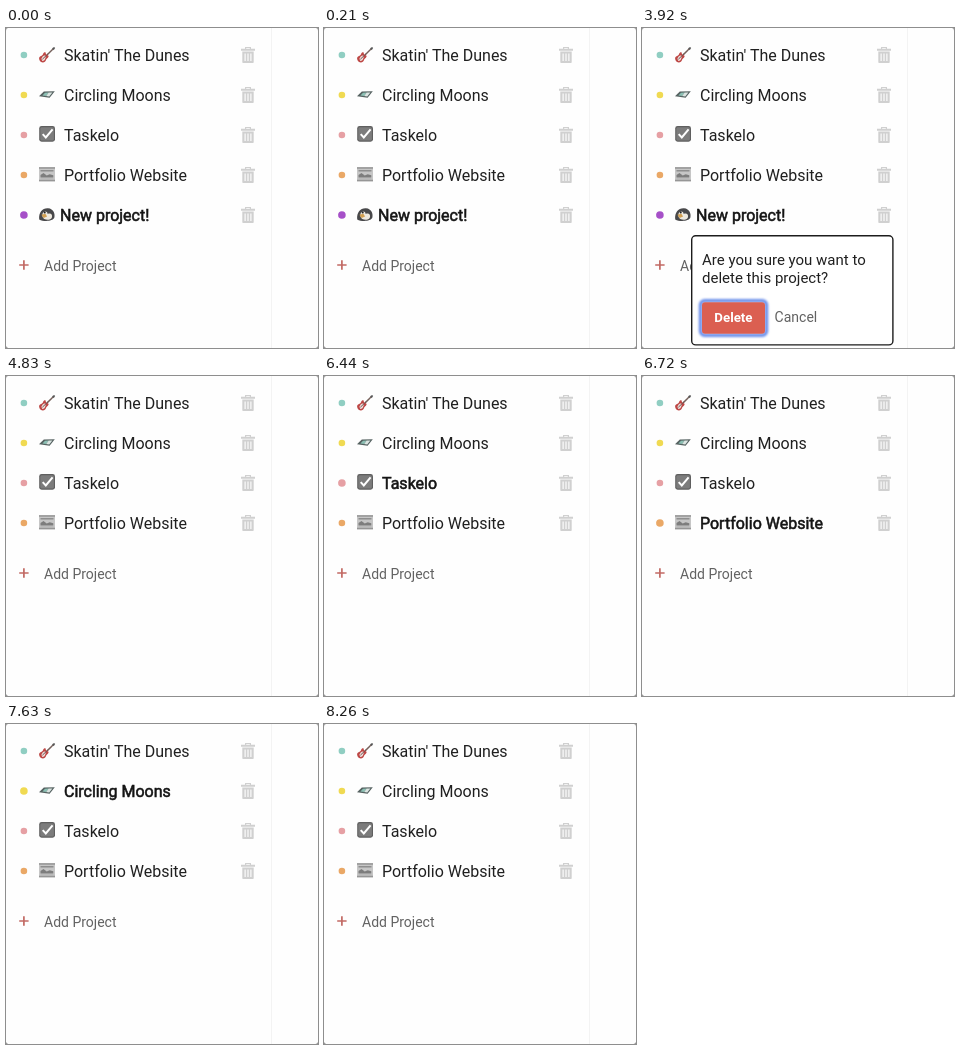
These frames come from a looping animation (312 by 320 pixels, 9.03 s). An HTML page:

```html
<!DOCTYPE html>
<html lang="en">
<head>
<meta charset="utf-8">
<title>Project list</title>
<style>
  html, body { margin: 0; width: 100%; height: 100%; overflow: hidden; background: #8a8a8a; }
  svg { display: block; width: 312px; height: 320px; font-family: Roboto, Arial, sans-serif; }
  .name { font-size: 16px; fill: #202020; }
  .active .name { fill: #141414; stroke: #141414; stroke-width: .55px; }
  .soft { font-size: 14px; fill: #626262; }
  .ask { font-size: 15px; fill: #202020; }
  .go { font-size: 13.3px; font-weight: 700; fill: #fff; }
</style>
</head>
<body>
<svg viewBox="0 0 312 320">
  <defs>
    <filter id="blur" x="-20%" y="-30%" width="140%" height="160%"><feGaussianBlur stdDeviation=".8"/></filter>
    <g id="bin" fill="#d0d0d0">
      <path d="M-7-6.3h14v2h-14zM-3-6.2v-1.8h6v1.8h-1.2v-.8h-3.6v.8z"/>
      <path d="M-5.7-3.4h11.4v10.3q0 1.2-1.2 1.2h-9q-1.2 0-1.2-1.2z"/>
      <path d="M-2.9-1.4v7.4M0-1.4v7.4M2.9-1.4v7.4" stroke="#fff" stroke-width="1.1"/>
    </g>
    <g id="guitar">
      <path d="M0 0L6-6" stroke="#75605a" stroke-width="1.5"/>
      <path d="M5-6.8l2.1-1.2 1 1.1-1.3 2.1z" fill="#555"/>
      <path d="M-7.8 4.2C-8.4.8-5 1.4-4-.8-3.2-3.2-1-3.2-1.2-1.2-.8.3 1.8-.5 1.6 1.6 1.2 3.6-.6 3.2-1 5.1-1.7 8.2-6.8 8.4-7.8 4.2z" fill="#bd4745"/>
      <path d="M-5.6 3.8C-4.6.6-2.6-.2-1.4.8-1 3-2.6 6.4-4.7 6z" fill="#efdedb"/>
      <path d="M-4.6 4.2L1-1.2" stroke="#6b5552" stroke-width="1"/>
    </g>
    <g id="glider">
      <path d="M-8 1.2L-3.2-3.4 7.8-3.8 2.6 2.8z" fill="#566261"/>
      <path d="M-4.6.5L-2-2.3 1.6-2.5-.8 1z" fill="#8cc0b4"/>
      <path d="M-.8 1L1.6-2.5 5.4-2.6 2.2 1.4z" fill="#dbe5e2"/>
    </g>
    <g id="check">
      <rect x="-7.8" y="-8.9" width="15.8" height="15.6" rx="2.4" fill="#5f5f5f"/>
      <rect x="-6.7" y="-7.8" width="13.6" height="13.4" rx="1.5" fill="#7c7c7c"/>
      <path d="M-4.3-.9L-1.2 2.4 5.6-5.6" fill="none" stroke="#fff" stroke-width="2"/>
    </g>
    <g id="paper">
      <rect x="-8" y="-8" width="16" height="14.4" fill="#c6c6c6"/>
      <path d="M-8-6.9h16M-8 5.6h16" stroke="#969696" stroke-width="1.5"/>
      <path d="M-6.5-4.2h13" stroke="#858585" stroke-width="1.3"/>
      <path d="M-6.5 2.6v-2.6l3-2 3.2 2.4 3-1.2 3.6 1v2.4z" fill="#7d7d7d"/>
      <path d="M-6.5 3.9h13" stroke="#adadad" stroke-width=".8"/>
    </g>
    <g id="bird">
      <path d="M-7.8 4.4C-8.5-2.7-4.5-7.2 1-6.8 6.6-6.4 8.4-1 7.3 2.8 5.8 6.4-3.5 6.8-7.8 4.4z" fill="#48484a"/>
      <path d="M-4.5-1.2C-3.5-4.2.4-4.3.7-1 3.6-2.5 5.6-.4 5 2.2 3.7 5.8-3.5 5.6-4.5 1.8z" fill="#eee9df"/>
      <path d="M-5.6-.2L-1.6-1.2 .1 1.4-3.4 2.9z" fill="#d2a052"/>
      <circle cx="-2.3" cy="-2.4" r="1" fill="#222"/>
    </g>
  </defs>

  <rect width="312" height="320" rx="2.4" fill="#fefefe"/>
  <path d="M265.5 0V320" stroke="#f3f3f3"/>
  <g id="list"></g>
  <g id="add">
    <path d="M13.2-1h9.4M17.9-5.7v9.4" stroke="#c26a64" stroke-width="1.7"/>
    <text class="soft" x="38" y="5.3">Add Project</text>
  </g>
  <g id="dialog">
    <rect x="49.7" y="207.7" width="201.2" height="109.2" rx="4" fill="#fff" stroke="#1c1c1c" stroke-width="1.4"/>
    <text class="ask" x="60" y="237.3">Are you sure you want to</text>
    <text class="ask" x="60" y="255.3">delete this project?</text>
    <rect id="ring" x="58.6" y="272.8" width="65.8" height="34.4" rx="4" fill="none" stroke="#6c8fea" stroke-width="3.6" filter="url(#blur)"/>
    <rect x="60" y="274.2" width="63" height="31.6" rx="3" fill="#db5f51"/>
    <text class="go" x="72.3" y="294.3">Delete</text>
    <text class="soft" x="132.6" y="294.3">Cancel</text>
  </g>
</svg>
<script>
  const LOOP = 9030;
  const $ = id => document.getElementById(id);

  const projects = [
    ["Skatin' The Dunes", "#90cec2", "guitar", 58],
    ["Circling Moons", "#f0da52", "glider", 58],
    ["Taskelo", "#e6a0a4", "check", 58],
    ["Portfolio Website", "#eaa866", "paper", 58],
    ["New project!", "#a650c8", "bird", 54]
  ];

  $("list").innerHTML = projects.map(([name, color, icon, x], i) => `
    <g transform="translate(0 ${27 + 40 * i})">
      <circle cx="17.9" cy="0" r="3.3" fill="${color}"/>
      <use href="#${icon}" x="41" y="0"/>
      <text class="name" x="${x}" y="5.9">${name}</text>
      <use href="#bin" x="242" y="0"/>
    </g>`).join("");
  const rows = [...$("list").children];

  // [start ms, value]; hovered row counts from 1, 0 is none
  const hover = [
    [0, 5], [4830, 0], [6440, 3], [6510, 2], [6650, 3], [6720, 4], [6860, 3],
    [7000, 4], [7070, 0], [7210, 3], [7280, 2], [7350, 0], [7630, 2], [8190, 3], [8260, 0]
  ];
  const count = [[0, 5], [4830, 4]];
  const dialog = [[0, 0], [2380, 1], [3990, 0]];
  const ring = [[0, 0], [3780, .6], [3850, 1]];

  const at = (steps, t) => steps.reduce((v, s) => t >= s[0] ? s[1] : v, 0);
  const show = (el, on) => el.setAttribute("display", on ? "inline" : "none");

  function draw(now) {
    const t = now % LOOP;
    const over = at(hover, t), n = at(count, t);
    rows.forEach((row, i) => {
      const active = i + 1 === over;
      show(row, i < n);
      row.classList.toggle("active", active);
      row.firstElementChild.setAttribute("r", active ? 3.8 : 3.3);
    });
    $("add").setAttribute("transform", `translate(0 ${38 + 40 * n})`);
    show($("dialog"), at(dialog, t));
    $("ring").setAttribute("opacity", at(ring, t));
  }

  const start = performance.now();
  function tick() {
    draw(performance.now() - start);
    requestAnimationFrame(tick);
  }
  tick();
</script>
</body>
</html>
```
